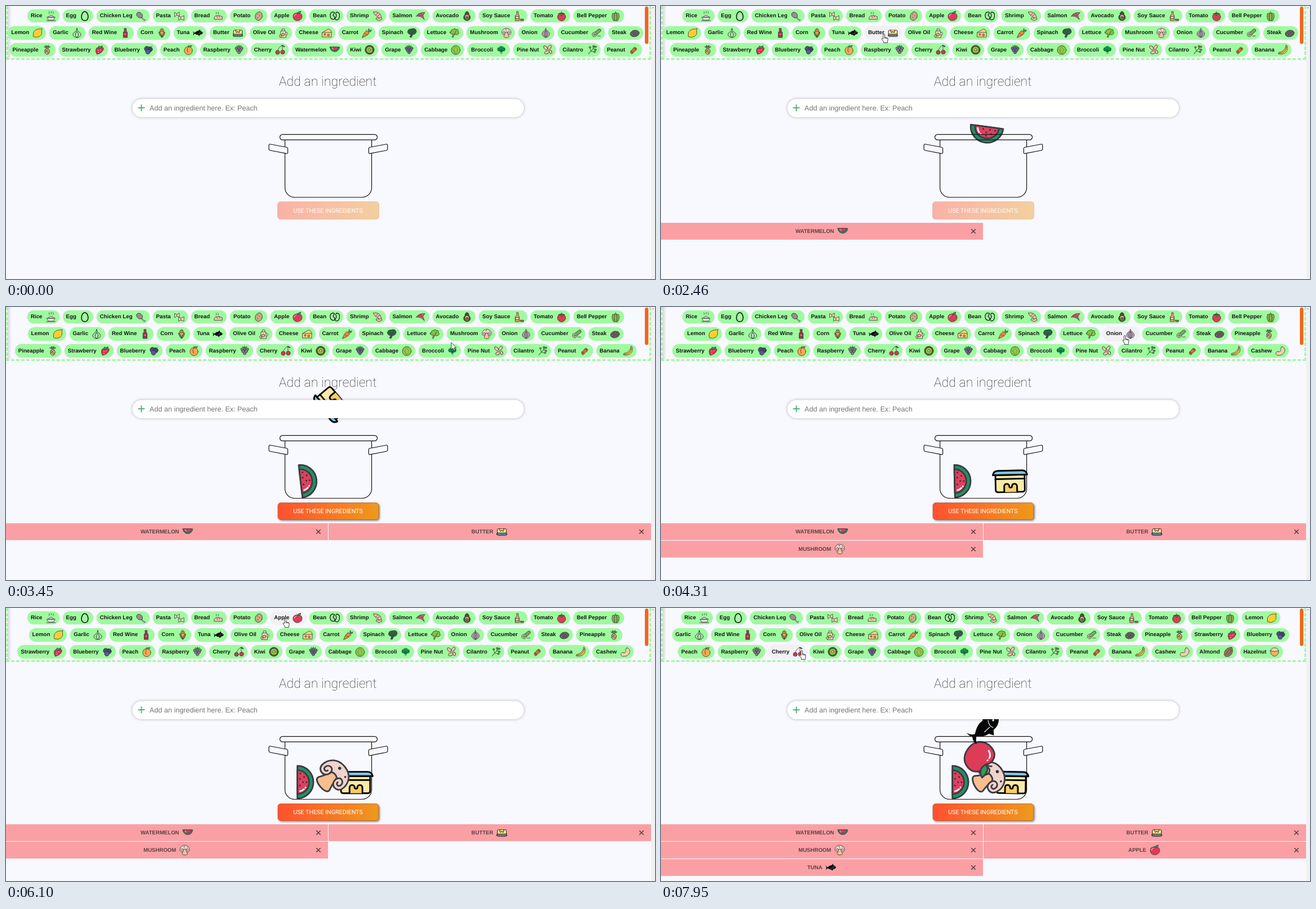
An HTML page for the animation above (8 s loop, 1153 by 486 pixels).

```html
<!DOCTYPE html>
<html lang="en">
<head>
<meta charset="utf-8">
<title>Add an ingredient</title>
<style>
  html, body { margin: 0; width: 100%; height: 100%; overflow: hidden; background: #f8f8ff; }
  body { position: relative; text-rendering: geometricPrecision; }
  #shelf { position: absolute; left: 0; top: 0; width: 1146px; height: 96px; box-sizing: border-box;
    border: 3px dashed #9ffa9f; border-top: 0;
    background: linear-gradient(90deg, rgba(0,0,0,.13), transparent 7px) padding-box; }
  #chips { position: absolute; left: -1.7px; top: 2.4px; width: 1139px; height: 91px; overflow: hidden;
    display: flex; flex-wrap: wrap; justify-content: center; align-content: flex-start; }
  .chip { display: flex; align-items: center; gap: 6px; height: 23.6px; margin: 3.35px 3px; padding: 0 6px 0 5.9px;
    border-radius: 12px; background: #9ffa9f; box-shadow: 0 0 3px rgba(0,0,0,.08);
    font: bold 9.76px "Liberation Sans", Arial, sans-serif; color: #151515; white-space: nowrap; }
  .chip.hover { background: #f1f1f4; }
  .chip svg { width: 18px; height: 18px; flex: none; }
  .icon { stroke: #3d3d42; stroke-width: .95; stroke-linejoin: round; stroke-linecap: round; fill: none; }
  #stage { position: absolute; left: 0; top: 0; }
  #bars text { font: bold 9.6px "Liberation Sans", Arial, sans-serif; fill: #5a4043; }
</style>
</head>
<body>
<div id="shelf"></div>
<div id="chips"></div>
<svg id="stage" width="1153" height="486" viewBox="0 0 1153 486">
  <defs>
    <linearGradient id="hot"><stop stop-color="#ff512f"/><stop offset="1" stop-color="#ee991b"/></linearGradient>
  </defs>
  <rect x="1146" width="7" height="486" fill="#f1f1f3"/>
  <path d="M1147.5 4l2-2.2 2 2.2z" fill="#a5a5a8"/>
  <rect x="1135" y="1" width="6.3" height="66.5" rx="3" fill="#f2651f"/>
  <text x="571.7" y="142" text-anchor="middle" font-family="Roboto, sans-serif" font-weight="100" font-size="23.2" fill="#222">Add an ingredient</text>
  <g id="bodies"></g>
  <g stroke="#111" stroke-width="1.2" fill="#f8f8ff" transform="translate(-.4 .2)">
    <path d="M496 238.5V323a17 17 0 0 0 17 17.3H633a17 17 0 0 0 17-17.3V238.5" fill="none"/>
    <rect x="487" y="228.4" width="173" height="9.8" rx="4.9" fill="none"/>
    <path id="handle" d="M470 245.8L499 251.3q2 .5 2 2.2v7.3q-.3 2-2.3 1.7L469.5 256.8q-2-.4-2-2.4v-6.5q.3-2.4 2.5-2.1z"/>
    <use href="#handle" transform="matrix(-1 0 0 1 1145.8 0)"/>
  </g>
  <rect x="224.5" y="165.5" width="695.5" height="32.5" rx="16.25" fill="#fff" style="filter:drop-shadow(0 0 2.5px rgba(0,0,0,.3))"/>
  <path d="M234.5 181.2h12M240.5 175.2v12" stroke="#4cb07a" stroke-width="1.9"/>
  <text x="255" y="185.7" font-family="Liberation Sans, Arial, sans-serif" font-size="12.6" fill="#757575">Add an ingredient here. Ex: Peach</text>
  <g id="button">
    <rect id="plate" y="348.5" rx="5" fill="url(#hot)" stroke="#b8582c" stroke-width=".8"/>
    <text id="label" x="572" text-anchor="middle" font-family="Roboto, sans-serif" font-size="10.7" fill="#fff">USE THESE INGREDIENTS</text>
  </g>
  <g id="bars"></g>
  <g id="cursor">
    <circle id="press" r="6.2" cy="1" fill="#ffee66" opacity=".85"/>
    <path id="hand" d="M-1.3 1a1.3 1.3 0 0 1 2.6 0v4.6l4.2 1q1.9.5 1.7 2.6l-.8 4.3v2H-.6v-2l-3.4-5q.5-2 2.7 0zM1.3 5.6v2.6M3.4 6.2v2.2M5.4 6.8v1.9" fill="#fff" stroke="#111" stroke-width=".8"/>
    <path id="arrow" d="M0 0v13l3-2.8 2 4.6 2-.9-2-4.5h4z" fill="#fff" stroke="#111" stroke-width=".8"/>
  </g>
</svg>
<script>
const $ = id => document.getElementById(id);
const LOOP = 8000;

// Icon parts on a 20 by 20 grid
const P = (d, fill = 'none', more = '') => `<path d="${d}" fill="${fill}" ${more}/>`;
const E = (x, y, rx, ry, fill = 'none', turn = 0) =>
  `<ellipse cx="${x}" cy="${y}" rx="${rx}" ry="${ry}" fill="${fill}" transform="rotate(${turn} ${x} ${y})"/>`;
const C = (x, y, r, fill) => E(x, y, r, r, fill);
const dot = (x, y, r, fill = '#333') => `<circle cx="${x}" cy="${y}" r="${r}" fill="${fill}" stroke="none"/>`;
const cluster = (fill, r = 2.8) =>
  [[5, 7], [10, 6], [15, 7], [7, 11], [13, 11], [10, 15]].map(([x, y]) => C(x, y, r, fill)).join('');
const sprig = P('M10 5V1M10 5l-4-3M10 5l4-3', 'none', 'stroke="#2f7a40" stroke-width="1.8"');
const shine = d => P(d, 'none', 'stroke="#fff" stroke-width=".9"');
const leaf = fill => P('M3 8Q2 3 7 3q3-3 6 0 5-1 4 4 3 4-1 6-4 2-6-1l-3 7-2-1 2-6q-6 1-7-4z', fill);
const bottle = fill => P('M8 1h4v5l2 3v10H6V9l2-3z', fill);

const ICONS = {
  Rice: P('M2 12h16l-3 6H5zM4 12q6-8 12 0z', '#d8e6d0') + P('M6 5q2-2 0-4M10 4q2-2 0-4M14 5q2-2 0-4M1 19h18'),
  Egg: P('M10 1C15 1 17 9 16.5 12.5 15.5 21 4.5 21 3.5 12.5 3 9 5 1 10 1z', 'none', 'stroke="#111" stroke-width="1.7"'),
  'Chicken Leg': P('M11 12l5 5q3-1 2 1-2 3-3 0l-5-5z', '#e5ddd0') + E(7, 8, 6.5, 5, '#96908c', 40),
  Pasta: P('M1 3l4 2 5-3v8L5 8 1 11zM9 10l4 2 6-3v9l-6-2-4 2z', '#efdcae') + P('M5 5v3M13 12v4'),
  Bread: P('M2 16q-1-6 5-7t11 2v5z', '#e6c9a4') + P('M7 10l2 3M11 9l2 3M6 6q2-2 0-4M10 6q2-2 0-4'),
  Potato: E(10, 10, 6.8, 8.6, '#c7ac82', 18) + dot(8, 6, .8) + dot(12, 9, .8) + dot(8, 13, .8),
  Apple: P('M10 5C6 2.5 1 5 1 10.5S5.5 19.5 10 19s9-3 9-8.5S14 2.5 10 5z', '#dc3c58') + P('M10 5Q9.5 3 8 2') +
    P('M10 5q0-4.5 6.5-4.5Q15.5 6 10 5z', '#2f9a5c') + shine('M3.5 10q.3-2.5 2.5-3.5M7.5 6.2h.2'),
  Bean: P('M8 2C1 1 0 9 2 13s9 5 8 0-4-3-3-5 4-6 1-6zM14 2c7 0 6 9 4 13s-9 3-7-1 3-3 2-6-2-5 1-6z', 'none', 'stroke="#111" stroke-width="1.4"'),
  Shrimp: P('M2 2c9-2 14 3 15 8l2 6-6 3-6-3 1-3 5 1c0-4-9-3-11-12z', '#efc09c') + P('M6 8l5-4M10 10l5-4M12 14l5-1'),
  Salmon: P('M1 10Q6 2 18 3l-4 6 3 8Q10 9 1 10z', '#df6070') + P('M6 7l7 3M9 5l5 3') + dot(5, 8, .7),
  Avocado: P('M10 1q4 0 4 6c6 6 1 12-4 12S0 13 6 7q0-6 4-6z', '#4c4c35') + E(10, 12, 4.3, 5, '#bfc96f') + C(10, 13, 2.4, '#986038'),
  'Soy Sauce': P('M6 1h3v5l2 3v10H3V9l3-3z', '#e6a35c') + P('M4 11h6v4H4z', '#f4dfb8') + P('M13 16h7l-1 3h-5z', '#c85b3c'),
  Tomato: C(10, 11.5, 8, '#d93f50') + P('M10 1v4M4 5l6-1 6 1-4 1-2 3-2-3z', '#3d8b48'),
  'Bell Pepper': P('M4 5q6-3 12 0 3 7-2 14h-8Q1 12 4 5z', '#82b944') + P('M8 5q-2 7 0 14M12 5q2 7 0 14M10 4V1'),
  Lemon: P('M2 17Q0 9 5 5t11-3l3-1-1 4q2 7-3 11T4 18z', '#fcd02c'),
  Garlic: P('M10 1q0 5 4 7c8 5 2 11-4 11S-2 13 6 8q4-2 4-7zM10 7q-6 7 0 12 6-5 0-12', '#a9e2a9', 'stroke="#222"'),
  'Red Wine': bottle('#a83540') + P('M7 10h6v5H7z', '#d9596a'),
  Corn: E(10, 9, 4, 8, '#e7a83f') + P('M4 8q1 8 6 11 5-3 6-11-5 2-6 11-1-9-6-11z', '#7b8c42') + P('M8 4h4M7 7h6'),
  Tuna: `<g stroke="none">${P('M0 6q1.5 3 3.7 3.4 4-4 8-4l2-2.6 1.2 2.9q3.8 1 5.1 4.3-2 3-6 3.5l-1.5 2.7-2-2.4q-3.500 0-6.800-2.800-1.500 1.400-2.500 4-1-2.700.3-5Q.3 8.500 0 6z', '#060606')}</g>` +
    dot(17, 8.6, .6, '#fff') + P('M14.5 7q-1.5 3 0 5M9 11.5l4-.7', 'none', 'stroke="#ddd" stroke-width=".45"'),
  Butter: `<g stroke="#050505">${P('M1.5 6q0-1.5 1.5-1.5h14q1.500 0 1.500 1.500v8.500h-17z', '#f7eba9') + P('M1.5 12.2h17') +
    P('M6 4.500v3q0 1.800 1.500 1.800T9 7.500q.8-.8 1.500 0 0 1.800 1.500 1.800t1.500-1.800v-3', '#f6cf6a') +
    P('M0 14.5h20q-.5 2.500-3 2.500H3q-2.500 0-3-2.500z', '#83c3ea')}</g>`,
  'Olive Oil': P('M5 6h9l1 13H4zM7 6V2h5v4M14 9q5-1 4 3-1 3-3 3', '#efe0b4') + C(9, 13, 3, '#d2c25a') + C(4, 16, 2.2, '#f4c98f'),
  Cheese: P('M1 9L13 2q6 2 6 7v9H1zM1 9h18', '#f5d27b') + C(6, 13, 1.6, '#d9a547') + C(13, 14, 2, '#d9a547'),
  Carrot: P('M1 19Q4 9 10 5l5 5Q11 16 1 19z', '#f68a2c') + P('M13 7l1-6 1 4 4-1-1 3-4 1', '#4ca553') + P('M6 11l2 2M9 13l2 1'),
  Spinach: P('M2 9Q1 2 9 2q9-3 10 5-1 6-7 6l-3 6-3-1 2-5Q3 13 2 9z', '#2e6244') + P('M7 17l7-11M10 12l-4-5'),
  Lettuce: leaf('#83c43d') + P('M9 14l4-8'),
  Mushroom: P('M7.2 8c.2 4-1.200 6-2.200 8.500-1 3.700 11 3.700 10 0-1-2.500-2.400-4.500-2.200-8.500z', '#f8be8f') +
    P('M10 .8C4 .8.8 5 .8 9.500c0 5 6.700 5 6.700.3 0-1.300.8-1.800 2.500-1.800s2.500.5 2.500 1.800c0 4.700 6.700 4.700 6.700-.3C19.200 5 16 .8 10 .8z', '#efd3cd') +
    P('M7.500 9.800C7.500 6 3 6.500 3 9.500c0 2 2.500 2 2.500.3M12.500 9.800c0-3.800 4.500-3.300 4.500-.3 0 2-2.500 2-2.500.3') + dot(9, 3.7, .9) + dot(15, 4.5, .6),
  Onion: P('M10 1q1 4 5 6c6 6 0 11-5 12C5 18-1 13 5 7q4-2 5-6z', '#b9a3b2') + P('M10 5q-7 7 0 14 7-7 0-14M10 5v14'),
  Cucumber: P('M6 9L15 2q4 0 4 4l-9 8z', '#76ab5c') + C(6, 13, 4.5, '#c5df9b') + C(6, 13, 2, '#93c368') + P('M12 16h6'),
  Steak: E(10, 11, 9, 6.5, '#69605f', -12) + P('M4 12l5-5M7 15l7-8M12 15l4-5') + C(5, 13, 1.4, '#c6b7ad'),
  Pineapple: P('M10 7L4 4l4 0-1-3 3 2 3-2-1 3h4z', '#4a9a51') + E(10, 13, 4.8, 6, '#dfb464') + P('M6 11l7 7M6 15l7-7M7 9l7 7'),
  Strawberry: P('M10 5q9-2 8 4Q15 17 5 19 1 12 4 7z', '#d83450') + P('M7 6l2-4 2 2 5-2-2 4q-4 3-7 0z', '#3d9850') + dot(8, 11, .7, '#fff') + dot(12, 10, .7, '#fff') + dot(8, 15, .7, '#fff'),
  Blueberry: C(7, 8, 5, '#4c4b7c') + C(13, 9, 5, '#3f4268') + C(9, 14, 4.6, '#575995') + P('M14 6l4-4', 'none', 'stroke="#2c8049"'),
  Peach: C(10, 11.5, 8, '#ffa94c') + P('M10 4q-4 5-1 11M10 4V1') + P('M10 4q2-4 7-2-2 4-7 2z', '#65b35d'),
  Raspberry: cluster('#8b7f8a') + sprig,
  Cherry: P('M5 13Q6 5 14 1q0 7 1 11') + P('M14 1q4 0 5 3-4 1-5-3z', '#388e4e') + C(5, 15, 4, '#d7374c') + C(15, 14.5, 4, '#d7374c'),
  Watermelon: P('M.5 4.500h19a9.500 9.300 0 0 1-19 0z', '#219165') + P('M3 4.500h14a7 6.800 0 0 1-14 0z', '#df405f') +
    shine('M4.700 6q.2 1.300 1.200 2.300M6.800 9.200h.1') + [[8, 6], [12, 6], [15, 6.2], [10, 7.8], [13, 8.4], [10, 9.8]].map(([x, y]) => dot(x, y, .5)).join(''),
  Kiwi: C(10, 10, 9, '#59523f') + C(10, 10, 6.7, '#91c52f') + C(10, 10, 2.2, '#d8e9ae'),
  Grape: cluster('#70658f') + sprig,
  Cabbage: C(10, 10.5, 8.8, '#91c948') + P('M10 19Q3 11 9 4M10 19q7-8 1-14M3 9q4 2 7 9', 'none', 'stroke="#659c35"'),
  Broccoli: `<g stroke="none">${P('M8 11h4v7H8z', '#7bc058') + C(6, 9, 4, '#108044') + C(14, 9, 4, '#108044') + C(10, 7, 4.5, '#14914a') + C(10, 12, 3, '#0e7040')}</g>`,
  'Pine Nut': E(6, 6, 2.8, 5, '#efc9a2', -40) + E(14, 5, 2.8, 5, '#efc9a2', 35) + E(9, 15, 2.8, 5, '#efc9a2', 70) + E(16, 14, 2.5, 4, '#efc9a2', -20),
  Cilantro: P('M3 18L16 4M8 13L6 6M8 13l8 1M12 8l1-6M12 8l6 2', 'none', 'stroke="#4d8d42" stroke-width="1.5"') +
    [[6, 5], [13, 3], [17, 4], [17, 10], [15, 14]].map(([x, y]) => C(x, y, 1.7, '#6cae51')).join(''),
  Peanut: P('M4 14q0-4 4-4 1-5 5-5 5 2 2 6-2 2-4 2-2 5-5 5-2-1-2-4z', '#d7762f') + dot(7, 14, 1.2) + dot(13, 8, 1.2),
  Banana: P('M16 1l2 1q3 10-5 15-6 3-12 1l1-3Q14 14 16 1z', '#f7cd40') + P('M3 17q13-1 14-13'),
  Cashew: P('M14 2q6 2 5 9-3 9-14 8-5-2-3-6 2-3 6-1 4 0 3-6 0-4 3-4z', '#efd2a6'),
  Almond: P('M17 1q4 10-3 16T2 17Q1 8 7 4t10-3z', '#98765d') + P('M5 15Q8 7 15 4M9 16q6-4 7-10'),
  Hazelnut: P('M2 8q8-5 16 0 1 8-8 11Q1 16 2 8z', '#efb35f') + P('M2 8Q4 2 10 2t8 6q-8 3-16 0z', '#efd6a9'),
};

const icon = name => `<g class="icon">${ICONS[name]}</g>`;

// Each pick: click time, then poses of [time, x, y, turn]
const PICKS = {
  Watermelon: [1720, [1870, 577, 100, 0], [2620, 577, 312, 9.7], [3000, 549, 306, -60], [3300, 540.5, 308, -98], [5000, 538, 310, -90], [6050, 534.5, 310, -90]],
  Butter: [2860, [3008, 575, 100, 0], [3762, 583, 307, 85], [4150, 615, 310, 170], [4400, 621, 313, 180], [7209, 621, 313, 180], [7290, 622, 313, 181]],
  Mushroom: [4310, [4459, 580, 100, 0], [5191, 580, 300, 50], [5700, 580, 300, 50], [7209, 580, 300, 50], [7290, 582, 303, 62]],
  Apple: [6400, [6550, 572, 100, 0], [7209, 571, 262, 125], [7290, 570, 265, 140], [7950, 567, 267, 140]],
  Tuna: [7300, [7395, 572, 100, -10], [8008, 575, 240, -36]],
};
const picks = Object.entries(PICKS).map(([name, [click, ...poses]]) => ({ name, click, poses }));

// Pointer moves: start, end, x, y, sag
const MOVES = [
  [130, 880, 569, 73, 0], [1780, 2330, 396, 50, 0], [2920, 3560, 824, 51, 43],
  [5740, 6080, 496, 19, 0], [6500, 7100, 280, 51, 0], [7600, 7930, 250, 76, 0],
];

const clamp = u => Math.max(0, Math.min(1, u));
const mix = (a, b, u) => a + (b - a) * u;
const show = (el, on) => { el.style.display = on ? '' : 'none'; };

const chips = Object.keys(ICONS).map(name => {
  const el = document.createElement('div');
  el.className = 'chip';
  el.innerHTML = `<span>${name}</span><svg viewBox="0 0 20 20">${icon(name)}</svg>`;
  $('chips').append(el);
  return { name, el };
});

function addGroup(parent, markup) {
  const g = document.createElementNS(parent.namespaceURI, 'g');
  g.innerHTML = markup;
  parent.append(g);
  return g;
}

picks.forEach((pick, i) => {
  pick.chip = chips.find(c => c.name === pick.name).el;
  pick.body = addGroup($('bodies'), `<g transform="scale(3.05) translate(-10 -10)">${icon(pick.name)}</g>`);
  const left = i % 2 * 573, right = left ? 1129 : 555;
  pick.bar = addGroup($('bars'),
    `<rect x="${left}" width="${left ? 573 : 572}" height="30" fill="#faa0a4"/>
     <text y="18">${pick.name.toUpperCase()}</text>
     <g class="mark">${icon(pick.name)}</g>
     <path d="M${right - 3.8} 11.2l7.6 7.6m0-7.6l-7.6 7.6" stroke="#543a3d" stroke-width="1.5"/>`);
  const text = pick.bar.querySelector('text');
  const width = text.getComputedTextLength();
  const start = left + 285.5 - (width + 24.5) / 2;
  text.setAttribute('x', start);
  pick.bar.querySelector('.mark').setAttribute('transform', `translate(${start + width + 6} 5.7) scale(.93)`);
});

function poseAt(poses, t) {
  let i = 1;
  while (i < poses.length - 1 && t > poses[i][0]) i++;
  const a = poses[i - 1], b = poses[i];
  const u = clamp((t - a[0]) / (b[0] - a[0]));
  const ease = u * (2 - u);
  return i === 1
    ? [mix(a[1], b[1], u), mix(a[2], b[2], u * u), mix(a[3], b[3], u)]
    : [1, 2, 3].map(k => mix(a[k], b[k], ease));
}

function pointerAt(t) {
  let x = 1043, y = 438;
  for (const [from, to, toX, toY, sag] of MOVES) {
    const u = clamp((t - from) / (to - from)), p = u * u * (3 - 2 * u);
    x = mix(x, toX, p);
    y = mix(y, toY, p) + 4 * p * (1 - p) * sag;
  }
  return [x, y];
}

function drawButton(ready) {
  const plate = $('plate');
  $('button').setAttribute('opacity', ready ? 1 : .42);
  $('button').style.filter = ready ? 'drop-shadow(2px 2px 1.5px rgba(0,0,0,.4))' : 'none';
  plate.setAttribute('x', ready ? 483 : 482.5);
  plate.setAttribute('width', ready ? 179 : 180);
  plate.setAttribute('height', ready ? 30 : 31);
  $('label').setAttribute('y', ready ? 367.3 : 368);
}

function draw(t) {
  const ready = picks.filter(p => t >= p.click).length > 1;
  drawButton(ready);

  picks.forEach((pick, i) => {
    const chosen = t >= pick.click, falling = t >= pick.poses[0][0];
    show(pick.chip, !chosen);
    show(pick.bar, chosen);
    show(pick.body, falling);
    pick.bar.setAttribute('transform', `translate(0 ${(ready ? 385 : 386) + 31 * (i >> 1)})`);
    if (falling) {
      const [x, y, turn] = poseAt(pick.poses, t);
      pick.body.setAttribute('transform', `translate(${x} ${y}) rotate(${turn})`);
    }
  });

  const [x, y] = pointerAt(t), visible = t >= 130;
  let over = false;
  for (const { el } of chips) {
    const r = el.getBoundingClientRect();
    const hit = visible && y < 93 && x > r.left && x < r.right && y > r.top && y < r.bottom;
    el.classList.toggle('hover', hit);
    over = over || hit;
  }
  show($('cursor'), visible);
  show($('hand'), over);
  show($('arrow'), !over);
  show($('press'), picks.some((p, i) => t < p.click && t >= p.click - (i ? 80 : 340)));
  $('cursor').setAttribute('transform', `translate(${x} ${y})`);
}

const begin = performance.now();
function tick() {
  draw((performance.now() - begin) % LOOP);
  requestAnimationFrame(tick);
}
tick();
</script>
</body>
</html>
```
